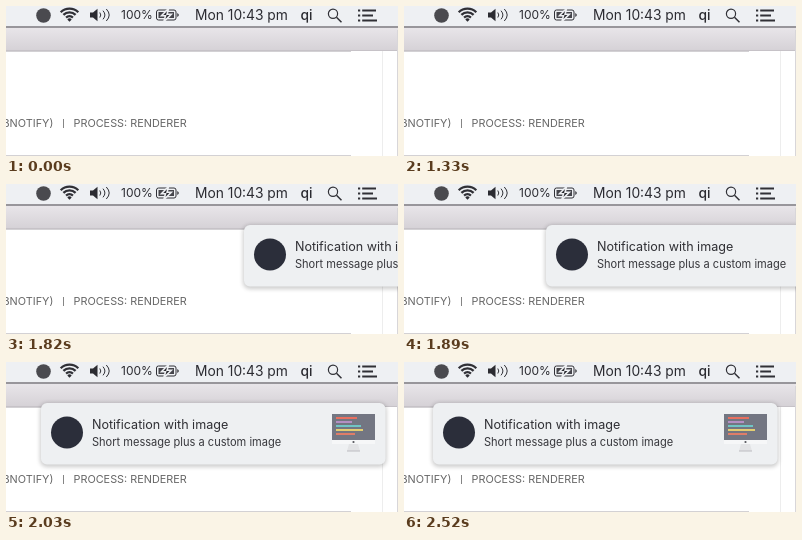
An HTML page that plays this animation: 392x150 px, repeating every 4690 ms.

```html
<!DOCTYPE html>
<html lang="en">
<head>
<meta charset="utf-8">
<title>Desktop notification</title>
<style>
  html, body { margin: 0; width: 100%; height: 100%; overflow: hidden; background: #fff; }
  svg { display: block; font-family: Inter, "Open Sans", sans-serif; white-space: pre; }
  .line { fill: none; stroke: #303036; }
</style>
</head>
<body>
<svg width="392" height="150" viewBox="0 0 392 150">
  <defs>
    <linearGradient id="title" x2="0" y2="1">
      <stop stop-color="#e8e5e9"/>
      <stop offset="1" stop-color="#d5d1d6"/>
    </linearGradient>
    <filter id="soft" x="-5%" y="-20%" width="110%" height="140%">
      <feGaussianBlur stdDeviation="2"/>
    </filter>
  </defs>

  <!-- window -->
  <rect width="392" height="150" fill="#fff"/>
  <path d="M376.5 45V150" stroke="#ededed"/>
  <rect y="22" width="392" height="23" fill="url(#title)"/>
  <path d="M0 44.5H392" stroke="#c6c2c7"/>
  <path d="M0 45.5H345M0 149.5H345" stroke="#d3d1d4"/>
  <path d="M391.5 24V150" stroke="#d8d6d9"/>
  <g font-size="10.85" fill="#666">
    <text x="-3.5" y="121">BNOTIFY)</text>
    <text x="67.5" y="121">PROCESS: RENDERER</text>
  </g>
  <path d="M57.5 113v9" stroke="#858585"/>

  <!-- menu bar -->
  <rect width="392" height="21" fill="#eef0f3"/>
  <path d="M0 21H392" stroke="#98969b" stroke-width="2"/>
  <g fill="#2b2b31">
    <circle cx="37.5" cy="9.5" r="7.3" fill="#4a4a4f"/>
    <path class="line" stroke-width="2.3" d="M54.7 6.2a12.4 12.4 0 0 1 17.6 0M57.4 8.9a8.6 8.6 0 0 1 12.2 0M60.1 11.6a4.8 4.8 0 0 1 6.8 0"/>
    <path d="M63.5 15.8l-2.2-2.4a3 3 0 0 1 4.4 0z"/>
    <path d="M84 6.5h3l4.5-3.7v12.4L87 11.5h-3z"/>
    <path class="line" d="M93.8 6.5q2 2.5 0 5M97 4.7q3.8 4.3 0 8.6M100.3 3q5.8 6 0 12"/>
    <text x="115" y="13" font-size="12">100%</text>
    <rect class="line" x="150.5" y="4" width="19.5" height="10" rx="2"/>
    <rect x="152.5" y="6" width="15.5" height="6" fill="#45454b"/>
    <path d="M171.3 7q3 2 0 4z"/>
    <path d="M162.5 2.5l-7 7.3h4l-1.6 5.7 7.4-7.3h-4.2z" stroke="#eef0f3" stroke-width="1.6"/>
    <g font-size="13.8">
      <text x="189" y="14">Mon 10:43 pm</text>
      <text x="294.5" y="14" font-weight="500">qi</text>
    </g>
    <circle class="line" cx="327" cy="7.8" r="4.6" stroke-width="1.2"/>
    <path class="line" stroke-width="1.5" d="M330.5 11.3l5 5"/>
    <path class="line" stroke-width="2" d="M352 4.5h2.2m2 0h13.8M352 9.5h2.2m2 0h10.8M352 14.5h2.2m2 0h14.8"/>
  </g>

  <!-- notification -->
  <g id="note" visibility="hidden">
    <rect x="28" y="41" width="346.5" height="64" rx="7" opacity=".2" filter="url(#soft)"/>
    <rect x="29" y="41" width="344.5" height="61.5" rx="6" fill="#eef0f2"/>
    <circle cx="55" cy="70.5" r="16" fill="#2b2e3a"/>
    <text x="80" y="67" font-size="12.55" fill="#2f2f34">Notification with image</text>
    <text x="80" y="84" font-size="11.05" fill="#37373c">Short message plus a custom image</text>
    <rect x="320" y="52" width="43" height="26" fill="#737682"/>
    <g stroke-width="2">
      <path d="M324 56h21" stroke="#e8705f"/>
      <path d="M324 60h16" stroke="#b48fc4"/>
      <path d="M324 64h25" stroke="#70c5c4"/>
      <path d="M324 68h27" stroke="#e3ce72"/>
      <path d="M324 72h19" stroke="#df7d68"/>
    </g>
    <path d="M320 78h43v4h-43z" fill="#f6f7f8"/>
    <path d="M337 82h9l2 7h-13z" fill="#e2e3e5"/>
    <path d="M335 89h13" stroke="#bdbdc2"/>
    <circle cx="341.5" cy="80" r="1.1" fill="#55565c"/>
  </g>
</svg>
<script>
  const LOOP = 4690, STEP = 70, ENTER = 1680;
  // distance left to slide at each step
  const offsets = [352, 295, 209, 113, 40, 6, 1, 0];
  const note = document.getElementById('note');

  function draw(now) {
    const t = now % LOOP;
    const step = Math.min(Math.floor((t - ENTER) / STEP), offsets.length - 1);
    note.setAttribute('visibility', step < 0 ? 'hidden' : 'visible');
    note.setAttribute('transform', `translate(${offsets[Math.max(step, 0)]} 0)`);
  }

  const start = performance.now();
  function tick() {
    draw(performance.now() - start);
    requestAnimationFrame(tick);
  }
  tick();
</script>
</body>
</html>
```
